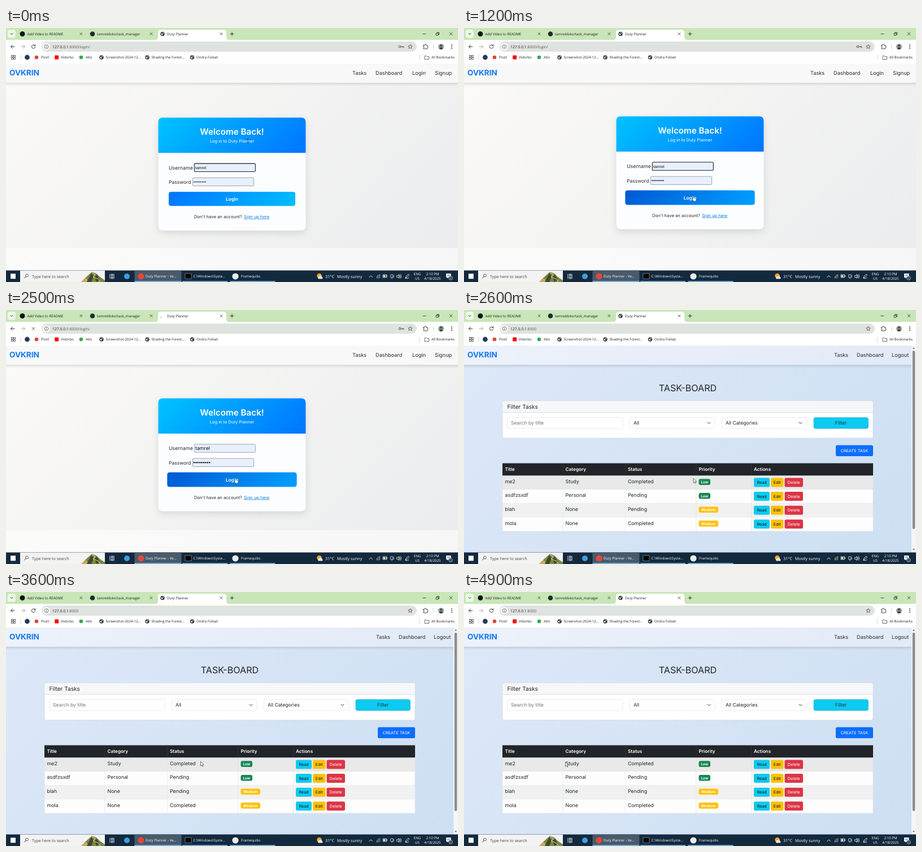
An HTML page for the animation above (5 s loop, 800 by 450 pixels).

```html
<!DOCTYPE html>
<html lang="en">
<head>
<meta charset="utf-8">
<title>Task board demo</title>
<style>
  html, body { margin: 0; width: 100%; height: 100%; overflow: hidden; }
  svg { display: block; width: 800px; height: 450px; font-family: Inter, sans-serif; }
  .ui { font-family: "Open Sans", sans-serif; }
  .line { fill: none; stroke-linecap: round; stroke-linejoin: round; }
</style>
</head>
<body>
<svg id="stage" viewBox="0 0 800 450" text-rendering="geometricPrecision"></svg>
<script>
const MID = 'text-anchor="middle"', SEMI = 'font-weight="600"', BOLD = 'font-weight="700"';
const INK = '#212529', BLUE = '#0d6efd', CYAN = '#0dcaf0', AMBER = '#ffc107', WHITE = '#fff';

const text = (x, y, str, size, fill = '#2b2b2b', extra = '') =>
  `<text x="${x}" y="${y}" font-size="${size}" fill="${fill}" ${extra}>${str}</text>`;
const rect = (x, y, w, h, fill, r = 0, extra = '') =>
  `<rect x="${x}" y="${y}" width="${w}" height="${h}" rx="${r}" fill="${fill}" ${extra}/>`;
const dot = (x, y, r, fill, extra = '') => `<circle cx="${x}" cy="${y}" r="${r}" fill="${fill}" ${extra}/>`;
const line = (d, color = '#333', width = .9, extra = '') =>
  `<path class="line" d="${d}" stroke="${color}" stroke-width="${width}" ${extra}/>`;
const shape = (d, fill, extra = '') => `<path d="${d}" fill="${fill}" ${extra}/>`;
const group = (id, body, extra = '') => `<g id="${id}" ${extra}>${body}</g>`;
const border = (color, width = .7) => `stroke="${color}" stroke-width="${width}"`;
const cross = (x, y, r, color) => line(`M${x - r} ${y - r}l${2 * r} ${2 * r}m0 ${-2 * r}l${-2 * r} ${2 * r}`, color, .8);
const chevron = (x, y, r = 2.5, color = '#333') => line(`M${x - r} ${y - r / 2}l${r} ${r}l${r} ${-r}`, color, 1);
const globe = (x, y) => dot(x, y, 3.8, '#3c4043') +
  shape(`M${x - 2.8} ${y - 1}l2.4 .4 1 1.4-1.6 1.8zM${x} ${y - 2.8}l2.4 1-1 1.4z`, WHITE);

// Diagonal (135deg) gradient across a box
const diagonal = (id, x, y, w, h, from, to) => {
  const cx = x + w / 2, cy = y + h / 2, d = (w + h) / 4;
  return `<linearGradient id="${id}" gradientUnits="userSpaceOnUse" x1="${cx - d}" y1="${cy - d}" x2="${cx + d}" y2="${cy + d}">
    <stop stop-color="${from}"/><stop offset="1" stop-color="${to}"/></linearGradient>`;
};

const defs = `<defs>
  ${diagonal('loginBg', 0, 62, 800, 328, '#fbfaf7', '#ebecee')}
  ${diagonal('stripBg', 0, 390, 800, 40, '#fbfbfa', '#f6f6f7')}
  ${diagonal('boardBg', 0, 62, 792, 368, '#dde8f8', '#cddff2')}
  ${diagonal('boardNav', 0, 62, 792, 35, '#edf2fb', '#e2eaf7')}
  ${diagonal('cardHead', 269.5, 156.5, 261, 62.5, '#00c3ff', '#0074ff')}
  ${diagonal('button', 288, 288, 224, 25, '#0074ff', '#00bfff')}
  ${diagonal('buttonHot', 288, 288, 224, 25, '#0058d2', '#00a0ff')}
  <linearGradient id="navShadow" x2="0" y2="1"><stop stop-opacity=".11"/><stop offset="1" stop-opacity="0"/></linearGradient>
  <filter id="soft" x="-20%" y="-20%" width="140%" height="140%"><feGaussianBlur stdDeviation="7"/></filter>
</defs>`;

function browser() {
  const tab = (x, closeX, label) => text(x, 12.6, label, 6.25, '#1f1f1f') + cross(closeX, 10.4, 2, '#333');
  const bookmark = (x, label) => text(x, 54.3, label, 6.15, '#1f1f1f');
  return rect(0, 0, 800, 22, '#c8e6b8') + rect(3, 3, 14, 14.5, '#edf7e6', 4) + chevron(10, 10.5, 2) +
    shape('M264 21q5 0 5-5V8q0-5 5-5H385q5 0 5 5v8q0 5 5 5z', WHITE) + rect(0, 21, 800, 42, WHITE) +
    dot(29, 10.5, 4.5, '#111') + tab(37.5, 133, 'Add Video to README') +
    dot(153, 10.5, 4.3, '#24292f') + tab(161, 257, 'tamreldoko/task_manager') + tab(285, 381, 'Duty Planner') +
    line('M397 10.5h6m-3-3v6', '#333', 1) +
    line('M738 10.5h5m18.5-1.2h3.6v3.6h-3.6zm1.4 0v-1.5h3.7v3.7h-1.5', '#222', .8) + cross(787.5, 10.4, 2.3, '#222') +
    line('M15 33H8.5m3-3l-3 3 3 3', '#333', 1) + line('M27 33h6.5m-3-3l3 3-3 3', '#a5a8a5', 1) +
    group('reload', line('M51.3 31.2a3.2 3.2 0 1 0 .5 2.4m.1-4v2h-2', '#333', 1)) + group('stop', cross(48.5, 33, 2.4, '#333')) +
    rect(63, 24, 664, 18, '#dfe3df', 9) + dot(71.5, 33, 6.3, WHITE) +
    dot(71.5, 33, 3.4, 'none', border('#444', .8)) + line('M71.5 32.8v1.8m0-3.2v0', '#444', .8) +
    text(82, 35.5, '127.0.0.1<tspan fill="#5a5d5a">:8000<tspan id="path">/login/</tspan></tspan>', 6.8, '#1f1f1f') +
    group('key', dot(697, 33, 1.9, 'none', border('#555', 1)) + line('M699 33h5v1.5m-2-1.5v1.2', '#555', 1)) +
    shape('M715.5 29.2l1.1 2.5 2.7.2-2 1.8.6 2.6-2.4-1.4-2.4 1.4.6-2.6-2-1.8 2.7-.2z', 'none', border('#444', .8)) +
    line('M739 30.5h2q0-2 1.3-2t1.3 2h2v2q1.5 0 1.5 1.2t-1.5 1.2v2H739v-2q1.3 0 1.3-1.2T739 32.5z') +
    line('M756.5 29v8', '#c5dcb9') + dot(770, 33, 5, '#8b9a8d') + dot(770, 31.3, 1.8, '#39434a') +
    shape('M766.5 36.4q3.5-5 7 0-3.5 3-7 0z', '#39434a') +
    [30, 33, 36].map(y => dot(789, y, .9, '#333')).join('') +
    [9.5, 13.7].map(x => [48.5, 52.7].map(y => rect(x, y, 2.8, 2.8, 'none', 0, border('#444', .8))).join('')).join('') +
    line('M26 48v8M731.5 48v8', '#c5dcb9') + dot(37.5, 52, 4.4, '#24395f') +
    dot(54, 52, 3.3, '#e04436') + bookmark(62, 'Postl') + rect(86.2, 48.5, 7, 7, '#f00', 1) + bookmark(97, 'Vidorbo') +
    dot(133, 52, 3.3, '#34a853') + bookmark(141, 'Atlo') +
    globe(169, 52) + bookmark(176.5, 'Screenshot-2024-12...') + globe(250, 52) + bookmark(257.5, 'Shading the Forest...') +
    globe(329.5, 52) + bookmark(337, 'Ondra Foliset') +
    line('M741.5 49.5h2.5l1 1h3.5v5h-7z', '#444', .8) + bookmark(753, 'All Bookmarks') +
    group('favicon', globe(277, 10.5)) +
    group('spinner', dot(277, 10.5, 3.6, 'none', 'id="arc" pathLength="100" ' + border('#4b5663', 1.1)));
}

const nav = (fill, width, links) => rect(0, 97, width, 6, 'url(#navShadow)') + rect(0, 62, width, 35, fill) +
  text(6, 84.3, 'OVKRIN', 13.6, '#1478f0', BOLD) + links.map(([x, label]) => text(x, 83, label, 9.2)).join('');

function login() {
  const dots = (gap, r) => Array.from({ length: 9 }, (_, i) => dot(333 + i * gap, 270.3, r, '#111')).join('');
  return rect(0, 62, 800, 328, 'url(#loginBg)') + rect(0, 390, 800, 40, 'url(#stripBg)') +
    nav('#f8f8f8', 800, [[613, 'Tasks'], [654, 'Dashboard'], [719, 'Login'], [759, 'Signup']]) +
    group('card',
      rect(269.5, 161, 261, 200, '#000', 8, 'opacity=".11" filter="url(#soft)"') +
      rect(269.5, 156.5, 261, 200, '#fcfdff', 8) +
      shape('M269.5 219v-54.500q0-8 8-8h245q8 0 8 8V219z', 'url(#cardHead)') +
      text(400, 186.600, 'Welcome Back!', 15.2, WHITE, MID + SEMI) +
      text(400, 200.5, 'Log in to Duty Planner', 7.5, WHITE, MID) +
      text(288, 248.3, 'Username', 8.85) + text(288, 273.8, 'Password', 8.5) +
      rect(333.3, 237.8, 108, 14.4, '#e8f0fe', 1.5, 'id="user"') +
      rect(330.3, 263, 108.3, 14.4, '#e8f0fe', 1.5, border('#8a8d94', .8)) +
      group('preview', text(335, 247.7, 'tamrel', 7, '#111', 'font-family="Liberation Sans, Arial, sans-serif"') + dots(2.5, .95)) +
      group('filled', text(335, 248, 'tamrel', 8.8, '#111') + dots(3.4, 1.2)) +
      group('submit', rect(288, 288, 224, 25, 'url(#button)', 4) +
        rect(288, 288, 224, 25, 'url(#buttonHot)', 4, 'id="hot"') + text(400, 303.5, 'Login', 8.3, WHITE, MID + SEMI)) +
      text(333, 334.6, "Don't have an account?", 7.65) +
      text(421, 334.6, 'Sign up here', 7.55, '#0d7fe0', 'text-decoration="underline"'));
}

function board() {
  const columns = [72.5, 179.5, 290, 415.5, 513];
  const edges = [175, 285.5, 411, 508.5];
  const tasks = [['me2', 'Study', 'Completed', 'Low'], ['asdfzsxdf', 'Personal', 'Pending', 'Low'],
    ['blah', 'None', 'Pending', 'Medium'], ['mola', 'None', 'Completed', 'Medium']];
  const button = (x, y, w, h, label, fill, color, size = 7.2) =>
    rect(x, y, w, h, fill, 2.5) + text(x + w / 2, y + h / 2 + size * .36, label, size, color, MID);
  const field = (x, w, label, color = INK) =>
    rect(x, 190.5, w, 19.5, WHITE, 3, border('#dee2e6')) + text(x + 6.5, 203.4, label, 8.6, color);
  const rules = (xs, y, h, color) => line(xs.map(x => `M${x} ${y}v${h}`).join(''), color, .6);
  const row = ([title, category, status, priority], i) => {
    const y = 293.5 + i * 24.6, low = priority === 'Low', w = low ? 20.5 : 34.5;
    // The first row stays highlighted under the pointer
    return rect(68, y, 656, 24.6, ['#e9e9e9', '#fdfdfd', '#f1f1f1', '#fdfdfd'][i]) +
      line(`M68 ${y + 24.6}H724`, '#dee2e6', .6) +
      [title, category, status].map((s, c) => text(columns[c], y + 13.3, s, 8.9, INK)).join('') +
      rect(415.5, y + 5.8, w, 10.6, low ? '#198754' : AMBER, 3) +
      text(415.5 + w / 2, y + 13.4, priority, 6.3, WHITE, MID + BOLD) +
      button(513, y + 4, 28, 16, 'Read', CYAN, '#111') + button(543, y + 4, 22.5, 16, 'Edit', AMBER, '#111') +
      button(567.5, y + 4, 32.5, 16, 'Delete', '#dc3545', WHITE);
  };
  return rect(0, 62, 800, 368, 'url(#boardBg)') +
    nav('url(#boardNav)', 792, [[655, 'Tasks'], [695, 'Dashboard'], [757, 'Logout']]) +
    rect(792, 62, 8, 368, '#f4f5f6') + rect(793.8, 72, 4.5, 316, '#8a8c8e', 2.2) +
    shape('M794 69l2-3 2 3zM794 423l2 3 2-3z', '#77797b') +
    text(396, 143.8, 'TASK-BOARD', 16.1, INK, MID) +
    rect(68, 161, 656, 66, WHITE, 3.5, border('#ced5dd')) +
    shape('M68.4 181.5v-17q0-3 3-3H720.600q3 0 3 3v17z', '#f6f7f8') + line('M68 181.6H724', '#ced5dd', .7) +
    text(76.5, 174.5, 'Filter Tasks', 10.1, INK) +
    field(76.5, 204.5, 'Search by title', '#6c757d') + field(293.5, 150.5, 'All') + field(456.5, 150, 'All Categories') +
    chevron(433.5, 200.3) + chevron(595.5, 200.3) +
    rect(619, 190.5, 96.5, 19.5, CYAN, 3, border('#20a9c4', .6)) + text(667, 203.4, 'Filter', 8.6, '#14343c', MID) +
    button(658, 239.5, 66, 19.5, 'CREATE TASK', BLUE, WHITE, 7.3) +
    rect(68, 271.5, 656, 22, INK) +
    ['Title', 'Category', 'Status', 'Priority', 'Actions'].map((s, c) => text(columns[c], 285.4, s, 8.2, WHITE, SEMI)).join('') +
    tasks.map(row).join('') + rules([68, ...edges, 724], 293.5, 98.5, '#dee2e6') + rules(edges, 272, 21, '#373b3e');
}

function taskbar() {
  const app = (x, w, label) => rect(x, 448.3, w, 1.7, '#76b9ed') + text(x + 19.5, 442.2, label, 6.2, WHITE);
  return rect(0, 429.5, 800, 20.5, '#13293d') + rect(8, 435.3, 9, 9, WHITE) +
    rect(25, 429.8, 150, 20.2, '#f3f3f3') + dot(37, 438.5, 2.4, 'none', border('#222')) + line('M35.2 440.4l-2.7 2.7', '#222') +
    text(46, 442.5, 'Type here to search', 7.2, '#444') +
    shape('M133 450l9-9 10-9 8 3 6 6 9 6v3z', '#7d8745') + shape('M133 450l8-7 7 7z', '#c9ab5c') +
    shape('M143 450l8-16 4 6-4 10zM160 450l-3-9 4-4 5 9z', '#3f4a2c') + line('M152 433l6 4-4 4 10 4 3 5', '#e3d9a0', 1) +
    line('M184 436v8M187 436h2v3h-2zM187 441h2v3h-2zM191 436v8', WHITE) + dot(214, 440, 5, '#3f9ee0') +
    rect(227.5, 429.5, 83, 20.5, '#495a6a') + dot(239, 440, 5.5, '#e2483b') + app(227.5, 83, 'Duty Planner - Ve...') +
    rect(317, 435, 11, 9.5, '#050505', 0, border('#a9b0b6', .6)) + app(312, 80, 'C:\\Windows\\Syste...') +
    dot(406, 440, 5.6, '#ececec') + app(396.5, 80, 'Framequibs') +
    dot(554.5, 439, 4.3, '#f6a11c') + shape('M553 444.5a2.3 2.3 0 0 1 1-4.2 3 3 0 0 1 5.5 1 1.7 1.7 0 0 1 0 3.2z', '#dbe8f5') +
    text(565, 442.6, '31°C', 7.3, WHITE) + text(586, 442.6, 'Mostly sunny', 7.2, WHITE) +
    line('M643 441.5l2.7-2.7 2.7 2.7', WHITE) +
    line('M656 443a6 6 0 0 1 6-6m-4 6a4 4 0 0 1 4-4m-2 4a2 2 0 0 1 2-2', '#d8dde2', .8) +
    line('M667.5 437h6v5h-6zm6 1.5h1v2h-1', WHITE, .8) + rect(668, 438, 3.5, 3.5, '#cfe6a5') +
    line('M681 437h4v5h-4zm2 5v2m3-6v4', '#d8dde2', .8) +
    line('M692 438.5h1.5l2-2v7l-2-2H692zM697 438q1.5 2 0 4m1.5-5.5q2.5 3.5 0 7', WHITE, .8) +
    line('M707 443l1-3 4-4 1.7 1.7-4 4zm0 0q4 2 6-.5', WHITE, .8) +
    text(728, 437.6, 'ENG', 6.1, WHITE, MID) + text(728, 446.2, 'US', 6.1, WHITE, MID) +
    text(755, 437.6, '2:10 PM', 6.2, WHITE, MID) + text(755, 446.2, '4/18/2025', 6.2, WHITE, MID) +
    shape('M779 435h8.5v7h-5l-1.7 2v-2H779z', WHITE) + line('M781 437.3h4.5m-4.5 2h4.5', '#13293d', .6) +
    dot(787, 443, 3.3, '#24384a', border(WHITE, .6)) + text(787, 445, '1', 5, WHITE, MID);
}

const arrow = shape('M0 0v8.2l1.9-1.8 1.3 2.8 1.2-.6-1.3-2.7h2.5z', WHITE, border('#222', .6));
const beam = line('M-1.3-3.5h2.6M0-3.5v7m-1.3 0h2.6', '#444', .7);
const hand = shape('M-.8 0q.8-1.2 1.6 0v3.3l3.4.8q.9.5.7 1.6L4.3 9H.6L-2 5.6q.2-1 1.2-.4z', WHITE, border('#222', .5));

document.getElementById('stage').innerHTML = defs + group('login', login()) + group('board', board()) +
  group('chrome', browser() + taskbar(), 'class="ui"') +
  group('cursor', group('arrow', arrow) + group('beam', beam) + group('hand', hand));

const el = id => document.getElementById(id);
const show = (id, on) => el(id).setAttribute('display', on ? 'inline' : 'none');
const set = (id, values) => Object.entries(values).forEach(([k, v]) => el(id).setAttribute(k, v));
const ease = (t, start, length) => {
  const p = Math.min(1, Math.max(0, (t - start) / length));
  return p * p * (3 - 2 * p);
};

const LOOP = 5000, STEP = 100, HOVER = 900, CLICK = 1400, LOADED = 2600;
// Pointer stops: time, x, y
const track = [[0, 428, 200], [500, 411, 278], [700, 411, 278], [1200, 406, 298],
  [3100, 406, 298], [4200, 263.5, 303], [4900, 179.5, 301]];

function pointer(t) {
  let [, x, y] = track[0];
  for (let i = 1; i < track.length; i++) {
    const [t0, x0, y0] = track[i - 1], [t1, x1, y1] = track[i];
    const p = ease(t, t0, t1 - t0);
    x += (x1 - x0) * p;
    y += (y1 - y0) * p;
  }
  return [x, y];
}

function render(t) {
  const [x, y] = pointer(t);
  const onBoard = t >= LOADED, clicked = t >= CLICK, loading = clicked && !onBoard;
  const onButton = !onBoard && y > 286;
  const onText = !onBoard && (y < 203 || (y > 262 && y < 280));
  const hover = ease(t, HOVER, 300);
  const arc = 24 + 18 * Math.cos((t - 1800) / 700 * Math.PI);

  show('login', !onBoard);
  show('board', onBoard);
  show('path', !onBoard);
  show('key', !onBoard);
  show('reload', !loading);
  show('stop', loading);
  show('favicon', !loading);
  show('spinner', loading);
  set('spinner', { transform: `rotate(${(t - 1800) * .36 - 120} 277 10.5)` });
  set('arc', { 'stroke-dasharray': `${arc} ${100 - arc}` });

  set('card', { transform: `translate(0 ${2.3 * (1 - ease(t, 0, 300))})` });
  set('user', { stroke: clicked ? '#8a8d94' : '#1b1d22', 'stroke-width': clicked ? .8 : 1.1 });
  show('preview', !clicked);
  show('filled', clicked);
  set('submit', { transform: `translate(400 300.5) scale(${1 + .022 * hover}) translate(-400 -300.5)` });
  set('hot', { opacity: hover });

  set('cursor', { transform: `translate(${x} ${y})` });
  show('hand', onButton);
  show('beam', onText);
  show('arrow', !onButton && !onText);
}

const start = performance.now();
function tick() {
  render(Math.floor((performance.now() - start) / STEP) * STEP % LOOP);
  requestAnimationFrame(tick);
}
tick();
</script>
</body>
</html>
```
